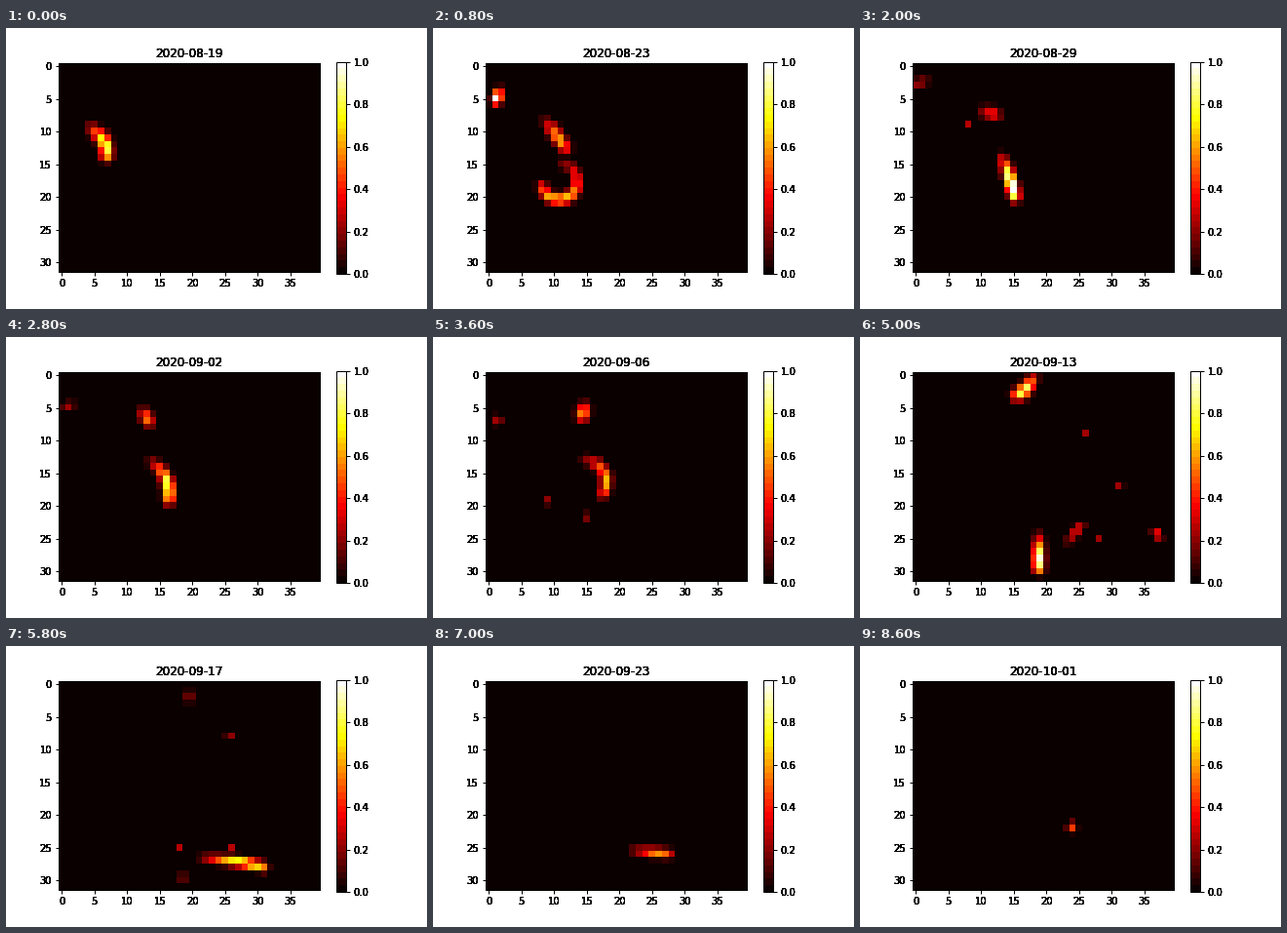
Animation, 432 px wide and 288 px high, one loop 9.6 s. Source, as a matplotlib script:

```python
import numpy as np
import matplotlib.pyplot as plt
from matplotlib.animation import FuncAnimation
from matplotlib.text import Text

ROWS, COLS = 32, 40
LAST_DAY = 43
HOLD = 4
FADE = 2
START = np.datetime64("2020-08-19")

Y, X = np.mgrid[:ROWS, :COLS, None][:2] if False else np.mgrid[:ROWS, :COLS]
S = np.linspace(-1, 1, 61)
# Heat grows toward the head of a front and falls off at both ends
PROFILE = (1 + 0.5 * S) * (1 - 0.5 * S ** 2)

plt.rcParams.update({"axes.linewidth": 1, "xtick.major.width": 1,
                     "ytick.major.width": 1})

draw_once = Text.draw


def draw_heavy(text, renderer):
    """Repeat the text so that its soft edges turn solid."""
    for _ in range(10):
        draw_once(text, renderer)


Text.draw = draw_heavy


def glow(x, y, heat, width):
    """Heat of each cell around a set of hot points."""
    d2 = (X[..., None] - x) ** 2 + (Y[..., None] - y) ** 2
    return (heat * np.exp(-d2 / width ** 2)).max(axis=2)


def lifetime(day, first, last):
    return np.interp(day, [first - FADE, first, last, last + FADE],
                     [0, 1, 1, 0])


def front(width, *poses):
    """An arc drifting through poses of
    day, x, y, length, direction, bend (degrees), heat."""
    days, *columns = np.array(poses, float).T

    def field(day):
        x, y, length, turn, bend, heat = (np.interp(day, days, c)
                                          for c in columns)
        heading = np.radians(turn + bend * S)
        px = np.cumsum(np.cos(heading)) * length / len(S)
        py = np.cumsum(np.sin(heading)) * length / len(S)
        heat = heat * lifetime(day, days[0], days[-1])
        return glow(x + px - px.mean(), y + py - py.mean(),
                    heat * PROFILE, width)

    return field


def spark(day, x, y):
    return lambda now: glow(np.array([x]), np.array([y]),
                            0.25 * lifetime(now, day, day), 0.6)


# One fire that splits into a northern and a southern front
OUTBREAK = (0, 6, 11.4, 5.4, 58, 35, 0.8)

fields = [
    front(0.95, OUTBREAK,
          (4, 10.2, 10.5, 5.2, 53, 5, 0.6),
          (10, 11.2, 7.3, 2.4, 10, 20, 0.38),
          (18, 14.5, 5.5, 2, 100, 0, 0.6),
          (25, 17, 1.8, 4.2, 130, 20, 0.8),
          (29, 19.3, 2, 0.8, 0, 0, 0.15)),
    front(0.85, OUTBREAK,
          (4, 11.6, 18.4, 11.9, 128, 122, 0.62),
          (10, 14.3, 17, 6.5, 72, 5, 1),
          (18, 17, 15.1, 7.2, 60, 60, 0.58),
          (25, 18.8, 27.2, 5, 90, 0, 0.9),
          (29, 18.5, 29.5, 1, 90, 0, 0.15)),
    front(0.75,
          (25, 24.2, 24.4, 3.6, -52, 0, 0.32),
          (29, 26.3, 27.2, 9.5, 8, 6, 0.75),
          (36, 24.5, 25.5, 5, 5, 0, 0.5),
          (43, 23.85, 21.9, 0.3, -35, 0, 0.44)),
    front(0.8,
          (4, 1.35, 4.6, 1.6, 110, 0, 1),
          (10, 1, 2.5, 2.2, 153, 0, 0.22),
          (18, 1.4, 7, 0.8, 180, 0, 0.22)),
    front(0.65,
          (22, 39, 23, 1.5, 45, 0, 0.3),
          (25, 36.8, 24.2, 1.5, 45, 0, 0.38)),
]

SPARKS = {
    10: [(8, 9)],
    18: [(9, 19.3), (15, 21.6)],
    25: [(26, 9), (31.2, 17), (28, 25)],
    29: [(26, 25), (18, 25), (25.7, 8)],
    40: [(13, 24), (29, 26)],
}
fields += [spark(day, *spot) for day, spots in SPARKS.items()
           for spot in spots]


def heat_map(day):
    heat = np.max([f(day) for f in fields], axis=0)
    return np.where(heat < 0.035, 0, heat)


fig, ax = plt.subplots(figsize=(6, 4), dpi=72)
fig.subplots_adjust(left=0.125, right=0.9, bottom=0.125, top=0.88)
image = ax.imshow(heat_map(0), cmap=plt.get_cmap("hot", 32), vmin=0, vmax=1,
                  interpolation="nearest")
bar = fig.colorbar(image)
bar.outline.set_linewidth(1)
title = ax.set_title(str(START))


def update(frame):
    day = min(frame, LAST_DAY)
    image.set_data(heat_map(day))
    title.set_text(str(START + day))
    return image, title


anim = FuncAnimation(fig, update, frames=LAST_DAY + 1 + HOLD, interval=200,
                     repeat=True, repeat_delay=0)
plt.show()
```
